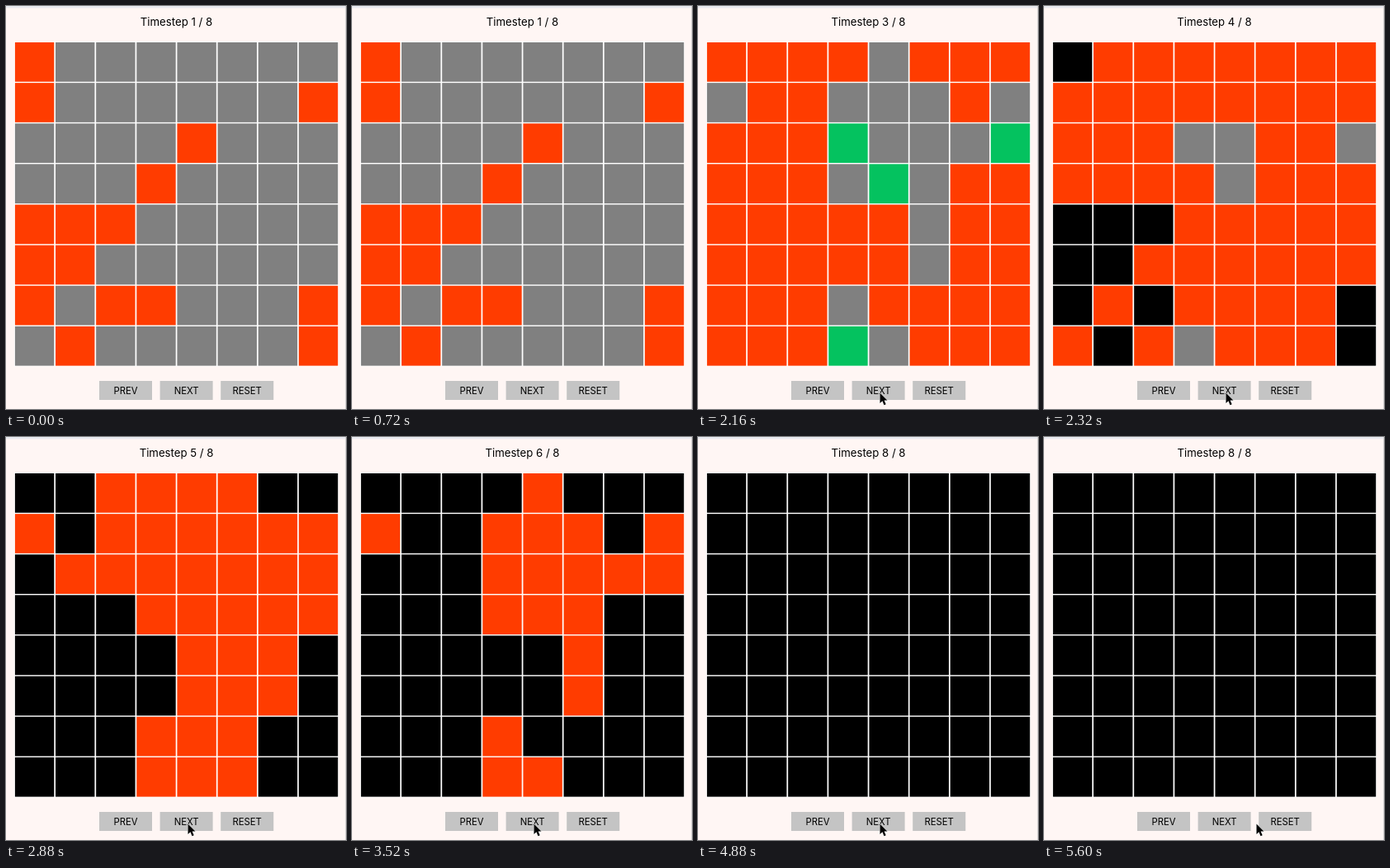
An HTML page that plays this animation: 412x488 px, repeating every 5680 ms.

```html
<!DOCTYPE html>
<html lang="en">
<head>
<meta charset="utf-8">
<title>Timestep grid</title>
<style>
  html, body { margin: 0; width: 100%; height: 100%; overflow: hidden; background: #fff6f4; }
  svg { display: block; }
  text { font-family: Inter, "Liberation Sans", sans-serif; text-anchor: middle; fill: #000; }
</style>
</head>
<body>
<svg id="stage" width="412" height="488" viewBox="0 0 412 488">
  <rect width="412" height="2.5" fill="#e9eaf0"/>
  <rect x="411" width="1" height="488" fill="#dcd8d8"/>
  <text id="title" x="206.5" y="24" font-size="13.2"></text>
  <rect x="10" y="43" width="393" height="393.5" fill="#fff"/>
  <g id="grid"></g>
  <g id="buttons" font-size="11.3"></g>
  <path id="cursor" d="M.5.5V13L3.4 10.3 5.5 15.2 7.7 14.2 5.6 9.5H9.5Z" stroke="#fff" stroke-width="1" paint-order="stroke"/>
</svg>
<script>
const LOOP = 5680, SIZE = 8, PITCH = 49.13;
const CLICKS = [880, 1600, 2240, 2800, 3520, 4160, 4880];
const START = ["R.......", "R......R", "....R...", "...R....",
               "RRR.....", "RR......", "R.RR...R", ".R.....R"];

// Cell values: 0 healthy, 1-3 steps infected, 4 dead, 5 recovered
const COLORS = ["#808080", "#ff3c00", "#ff3c00", "#ff3c00", "#000", "#04c25f"];

const byId = id => document.getElementById(id);

function add(parent, tag, attrs, label = "") {
  const el = document.createElementNS("http://www.w3.org/2000/svg", tag);
  for (const k in attrs) el.setAttribute(k, attrs[k]);
  el.textContent = label;
  return parent.appendChild(el);
}

const infected = c => c >= 1 && c <= 3;

// Infected neighbours on a grid that wraps at its edges
function count(cells, i) {
  const x = i % SIZE, y = Math.floor(i / SIZE);
  let n = 0;
  for (let dy = -1; dy <= 1; dy++)
    for (let dx = -1; dx <= 1; dx++) {
      const j = (y + dy + SIZE) % SIZE * SIZE + (x + dx + SIZE) % SIZE;
      if (j !== i && infected(cells[j])) n++;
    }
  return n;
}

function evolve(cells) {
  return cells.map((c, i) => {
    const n = count(cells, i);
    if (c === 0) return n >= 2 ? 1 : 0;
    if (c === 1) return n <= 2 ? 5 : 2;
    if (c === 5) return 0;
    return Math.min(c + 1, 4);
  });
}

const steps = [[...START.join("")].map(c => c === "R" ? 1 : 0)];
for (const _ of CLICKS) steps.push(evolve(steps.at(-1)));

const rects = steps[0].map((_, i) => add(byId("grid"), "rect", {
  x: 10.9 + i % SIZE * PITCH,
  y: 44 + Math.floor(i / SIZE) * PITCH,
  width: 47.4, height: 47.7
}));

["PREV", "NEXT", "RESET"].forEach((label, i) => {
  const x = 113 + 73.6 * i;
  add(byId("buttons"), "rect", { x, y: 454, width: 64, height: 23, fill: "#c4c4c4" });
  add(byId("buttons"), "text", { x: x + 32, y: 469.5 }, label);
});

let shown = -1;
function show(step) {
  if (step === shown) return;
  shown = step;
  byId("title").textContent = `Timestep ${step + 1} / ${SIZE}`;
  rects.forEach((r, i) => r.setAttribute("fill", COLORS[steps[step][i]]));
}

function draw(now) {
  const t = now % LOOP;
  show(CLICKS.filter(c => t >= c).length);
  const visible = t >= 320 && t < 720 || t >= 880;
  const x = t < 5520 ? 220 : t < 5600 ? 247 : 257;
  byId("cursor").setAttribute("transform", `translate(${x} 468)`);
  byId("cursor").setAttribute("visibility", visible ? "visible" : "hidden");
}

const begin = performance.now();
function tick() {
  draw(performance.now() - begin);
  requestAnimationFrame(tick);
}
tick();
</script>
</body>
</html>
```
